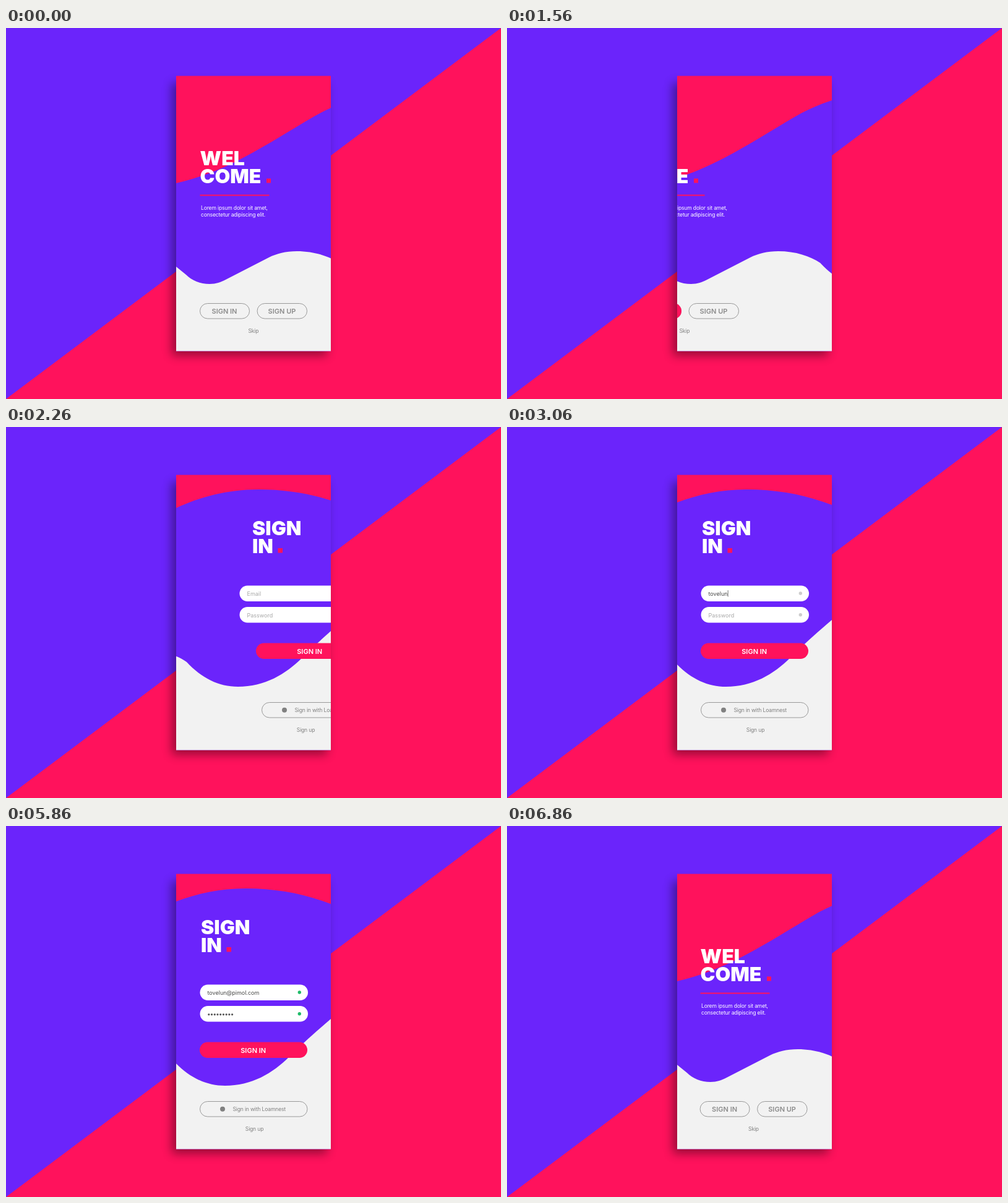
These frames come from a looping animation (800 px wide and 600 px high, 6960 ms). An HTML page:

```html
<!DOCTYPE html>
<html lang="en">
<head>
<meta charset="utf-8">
<title>Welcome and sign in</title>
<style>
  html, body { margin: 0; width: 100%; height: 100%; overflow: hidden; }
  svg { display: block; width: 100vw; height: 100vh; font-family: Inter, "Open Sans", sans-serif; }
  .pink { fill: #ff125c; }
  .purple { fill: #6b24fb; }
  .white { fill: #fff; }
  .title { font-size: 32px; font-weight: 900; fill: #fff; }
  .small { font-size: 8.6px; letter-spacing: -.18px; }
  .grey { fill: #808080; }
  .label { font-size: 11px; font-weight: 600; text-anchor: middle; }
  .outline { fill: none; stroke: #999; }
  .input { font-size: 9px; }
</style>
</head>
<body>
<svg viewBox="0 0 800 600">
  <defs>
    <clipPath id="card"><rect x="275" y="77.5" width="250" height="445"/></clipPath>
    <filter id="blur" x="-20%" y="-20%" width="140%" height="140%"><feGaussianBlur stdDeviation="8"/></filter>
  </defs>

  <rect class="purple" width="800" height="600"/>
  <path class="pink" d="M0 600L800 0V600Z"/>
  <rect x="268" y="89" width="251" height="441" opacity=".4" filter="url(#blur)"/>

  <g clip-path="url(#card)">
    <rect class="pink" x="275" y="77" width="250" height="446"/>
    <g id="wave">
      <path class="purple" d="M265 253L275 251C310 243 345 230 383 210C425 188 460 165 498 143
        C540 119 594 101 654 101C705 101 750 110 792 126L802 130V523H265Z"/>
      <path fill="#f2f2f2" d="M265 377L275 386L291 399C300 408 314 414 329 414C340 414 347 411 355 407
        L425 371C437 365 452 361 470 361C498 361 522 369 538 380C562 406 590 420 621 420
        C664 420 698 400 725 373C745 353 765 335 792 312L802 304V523H265Z"/>
    </g>

    <!-- welcome screen: data-out / data-in scale each part's slide -->
    <g class="welcome" data-out="119" data-in="1">
      <text class="title" x="313.5" y="222">WEL</text>
      <text class="title" x="313.5" y="251">COME</text>
      <rect class="pink" x="421" y="243.5" width="7" height="7"/>
    </g>
    <g class="welcome" data-out="106" data-in="1">
      <rect class="pink" x="313.5" y="269.5" width="112" height="2"/>
    </g>
    <g class="welcome" data-out="67" data-in="1">
      <text class="small white" x="315" y="294">Lorem ipsum dolor sit amet,</text>
      <text class="small white" x="315" y="304.5">consectetur adipiscing elit.</text>
    </g>
    <g class="welcome" data-out="112" data-in="1.4">
      <rect class="outline" x="313.5" y="445.5" width="80" height="24.5" rx="12.25"/>
      <text class="label" x="353" y="462" fill="#8c8c8c">SIGN IN</text>
      <g id="pressed">
        <rect class="pink" x="313" y="445" width="81" height="25.5" rx="12.75"/>
        <text class="label white" x="353" y="462">SIGN IN</text>
      </g>
      <rect class="outline" x="406" y="445.5" width="80.5" height="24.5" rx="12.25"/>
      <text class="label" x="446" y="462" fill="#8c8c8c">SIGN UP</text>
    </g>
    <g class="welcome" data-out="113" data-in="1.4">
      <text class="small grey" x="391.5" y="492.5">Skip</text>
    </g>

    <!-- sign-in screen -->
    <g class="signin" data-out="177" data-in="83">
      <text class="title" x="315" y="175">SIGN</text>
      <text class="title" x="315" y="204">IN</text>
      <rect class="pink" x="356.5" y="196" width="7.5" height="7.5"/>
    </g>
    <g class="signin" data-out="204" data-in="64">
      <rect class="white" x="313.5" y="256.5" width="174.5" height="25.5" rx="12.75"/>
      <rect class="white" x="313.5" y="291" width="174.5" height="25.5" rx="12.75"/>
      <text id="email" class="input" x="325.5" y="273"></text>
      <text id="hint" class="input" x="325.5" y="307.5" fill="#a8a8a8">Password</text>
      <g id="bullets" fill="#555"></g>
      <rect id="caret" width=".8" height="10.5" fill="#555"/>
      <circle id="emailDot" cx="474.3" cy="269" r="2.7"/>
      <circle id="passDot" cx="474.3" cy="303.7" r="2.7"/>
    </g>
    <g class="signin" data-out="161" data-in="91">
      <rect id="submit" x="313" y="349.5" width="174" height="25.5" rx="12.75"/>
      <text class="label white" x="399.7" y="366.5">SIGN IN</text>
    </g>
    <g class="signin" data-out="201" data-in="100">
      <rect class="outline" x="313.5" y="445.5" width="173.5" height="24.5" rx="12.25"/>
      <circle class="grey" cx="350" cy="457.7" r="4"/>
      <text class="small grey" x="366.5" y="461">Sign in with Loamnest</text>
    </g>
    <g class="signin" data-out="190" data-in="83">
      <text class="small grey" x="386.8" y="492.5">Sign up</text>
    </g>
  </g>
</svg>

<script>
const LOOP = 6960, WAVE = 267, GREEN = '#1fbb68', PINK = '#ff125c';
const ADDRESS = 'tovelun@pimol.com', SECRET_LENGTH = 9;
const $ = id => document.getElementById(id);
const clamp = (v, lo = 0, hi = 1) => Math.min(hi, Math.max(lo, v));
const smooth = p => p * p * (3 - 2 * p);

const bulletX = i => 327.8 + 4.72 * i;
const bullets = Array.from({ length: SECRET_LENGTH }, (_, i) => {
  const dot = document.createElementNS('http://www.w3.org/2000/svg', 'circle');
  dot.setAttribute('cx', bulletX(i));
  dot.setAttribute('cy', 304.8);
  dot.setAttribute('r', 1.6);
  return $('bullets').appendChild(dot);
});

// Ease with control points (a, 0) and (b, 1), solved by bisection.
function ease(x, a, b) {
  let lo = 0, hi = 1;
  for (let i = 0; i < 24; i++) {
    const s = (lo + hi) / 2, r = 1 - s;
    if (3 * r * r * s * a + 3 * r * s * s * b + s * s * s < x) lo = s; else hi = s;
  }
  return smooth(hi);
}

// The motion is choppy: ten poses a second, faster during the tap.
function snap(t) {
  if (t < 1000) return 0;
  if (t < 1160) return Math.floor(t / 20) * 20;
  return Math.floor((t - 60) / 100) * 100 + 60;
}

function waveShift(t) {
  if (t < 4000) return -WAVE * ease(clamp((t - 1300) / 1080), .353, .834);
  return -WAVE * (1 - smooth(clamp((t - 6160) / 712)));
}

function welcomeShift(t, out, into) {
  return t < 3000
    ? -out * (Math.max(0, t - 1260) / 300) ** 2
    : -into * (Math.max(0, 6880 - t) / 20) ** 2;
}

function signinShift(t, out, into) {
  return t < 4000
    ? into * (Math.max(0, 2360 - t) / 100) ** 1.5
    : out * (Math.max(0, t - 6160) / 400) ** 2;
}

function place(el, x) {
  el.setAttribute('transform', `translate(${clamp(x, -600, 600).toFixed(2)} 0)`);
}

function slide(name, shift, t) {
  for (const el of document.querySelectorAll('.' + name))
    place(el, shift(t, +el.dataset.out, +el.dataset.in));
}

function showForm(t) {
  const typed = t < 2560 ? 0 : clamp(Math.floor(1.5 + (t - 2560) / 90), 0, ADDRESS.length);
  const email = $('email');
  email.textContent = typed ? ADDRESS.slice(0, typed) : 'Email';
  email.setAttribute('fill', typed ? '#484848' : '#a8a8a8');

  const secret = t < 4460 ? 0 : t < 4660 ? 1 : clamp(Math.floor((t - 4460) / 100), 0, SECRET_LENGTH);
  bullets.forEach((dot, i) => dot.setAttribute('opacity', i < secret ? 1 : 0));
  $('hint').setAttribute('opacity', secret ? 0 : 1);

  const inEmail = typed > 0 && typed < ADDRESS.length;
  const inSecret = secret > 0 && secret < SECRET_LENGTH;
  const caret = $('caret');
  caret.setAttribute('opacity', inEmail || inSecret ? 1 : 0);
  caret.setAttribute('x', inSecret ? bulletX(secret - 1) + 2.6 : 325.7 + email.getComputedTextLength());
  caret.setAttribute('y', inSecret ? 298.5 : 264);

  $('emailDot').setAttribute('fill', t < 4460 ? '#ccc' : GREEN);
  $('passDot').setAttribute('fill', t < 5860 ? '#ccc' : GREEN);
  $('submit').setAttribute('fill', t < 6060 ? PINK : GREEN);
}

function draw(now) {
  const t = snap(now % LOOP);
  place($('wave'), waveShift(t));
  slide('welcome', welcomeShift, t);
  slide('signin', signinShift, t);
  $('pressed').setAttribute('opacity', t < 3000 ? clamp((t - 980) / 180) : 0);
  showForm(t);
}

const start = performance.now();
function tick() {
  draw(performance.now() - start);
  requestAnimationFrame(tick);
}
tick();
</script>
</body>
</html>
```
